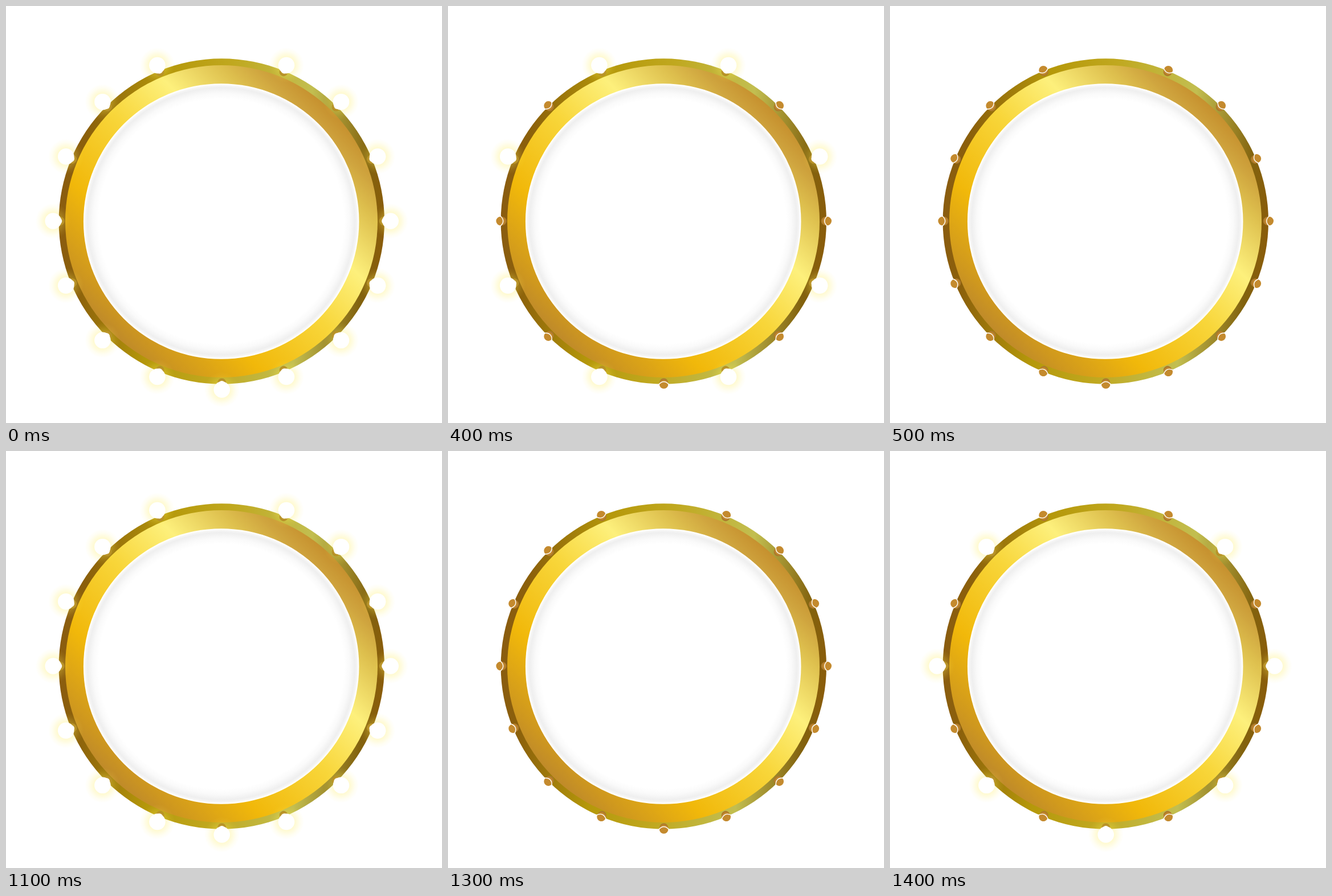
An HTML page for the animation above (1.8 s loop, 765 px wide and 732 px high).

```html
<!DOCTYPE html>
<html lang="en">
<head>
<meta charset="utf-8">
<title>Marquee ring</title>
<style>
  html, body { margin: 0; width: 100%; height: 100%; overflow: hidden; background: #fff; }
  svg { display: block; }
</style>
</head>
<body>
<svg width="765" height="732" viewBox="0 0 765 732">
  <defs>
    <linearGradient id="rim" gradientTransform="rotate(4 .5 .5)">
      <stop offset="0" stop-color="#8a5c10"/>
      <stop offset=".07" stop-color="#8b600b"/>
      <stop offset=".3" stop-color="#b5980a"/>
      <stop offset=".5" stop-color="#c0a81f"/>
      <stop offset=".75" stop-color="#c2be50"/>
      <stop offset=".94" stop-color="#82620e"/>
      <stop offset="1" stop-color="#8a5c0a"/>
    </linearGradient>
    <linearGradient id="face" gradientTransform="rotate(-45 .5 .5)">
      <stop offset="0" stop-color="#bf8a2a"/>
      <stop offset=".07" stop-color="#cf981e"/>
      <stop offset=".25" stop-color="#f1b80a"/>
      <stop offset=".5" stop-color="#f8d63a"/>
      <stop offset=".69" stop-color="#fdf07c"/>
      <stop offset=".85" stop-color="#dec04e"/>
      <stop offset=".93" stop-color="#cfa43e"/>
      <stop offset="1" stop-color="#c6902e"/>
    </linearGradient>
    <radialGradient id="hole">
      <stop offset=".89" stop-color="#fff"/>
      <stop offset=".93" stop-color="#fafafa"/>
      <stop offset=".97" stop-color="#efefef"/>
      <stop offset=".985" stop-color="#f5f5f5"/>
      <stop offset=".995" stop-color="#fff"/>
    </radialGradient>
    <radialGradient id="glow">
      <stop offset=".4" stop-color="#ffec50" stop-opacity=".3"/>
      <stop offset=".6" stop-color="#ffec50" stop-opacity=".19"/>
      <stop offset=".8" stop-color="#ffec50" stop-opacity=".07"/>
      <stop offset="1" stop-color="#ffec50" stop-opacity="0"/>
    </radialGradient>
    <g id="off">
      <circle cx="-2" r="7.6" fill="#ad792c"/>
      <circle cx="1" r="7.8" fill="#c48a2e"/>
      <path d="M2-9.5Q-9 0 2 9.5" fill="none" stroke="#fff" stroke-width="1.4"/>
    </g>
    <g id="on">
      <circle cx="-2" r="7.6" fill="#a67b1e"/>
      <circle cx="10.5" r="31" fill="url(#glow)"/>
      <circle cx="1" r="6" fill="#fff"/>
      <circle cx="10.5" r="14.3" fill="#fff"/>
    </g>
  </defs>
  <circle cx="378.3" cy="378" r="285.7" fill="url(#rim)"/>
  <circle cx="378" cy="378" r="274" fill="url(#face)"/>
  <circle cx="377.7" cy="378" r="241.8" fill="url(#hole)"/>
  <g id="lamps"></g>
</svg>
<script>
const LOOP = 1800, SLOTS = 16, RADIUS = 285.5;
const holder = document.getElementById("lamps");

// Evenly spaced from the bottom; the slot at the top stays empty
const lamps = [];
for (let i = 0; i < SLOTS; i++) {
  if (i === SLOTS / 2) continue;
  const el = document.createElementNS("http://www.w3.org/2000/svg", "use");
  const turn = 90 - i * 360 / SLOTS;
  el.setAttribute("transform", `translate(378.7 377.5) rotate(${turn}) translate(${RADIUS})`);
  holder.append(el);
  lamps.push({ el, odd: i % 2 });
}

// Start time, even lamps lit, odd lamps lit
const steps = [
  [0, 1, 1], [400, 0, 1], [500, 0, 0], [900, 1, 0],
  [1100, 1, 1], [1200, 0, 1], [1300, 0, 0], [1400, 1, 0]
];

function draw(t) {
  const [, even, odd] = steps.findLast(s => s[0] <= t);
  for (const lamp of lamps) {
    const lit = lamp.odd ? odd : even;
    lamp.el.setAttribute("href", lit ? "#on" : "#off");
  }
}

const start = performance.now();
function tick() {
  draw((performance.now() - start) % LOOP);
  requestAnimationFrame(tick);
}
draw(0);
requestAnimationFrame(tick);
</script>
</body>
</html>
```
